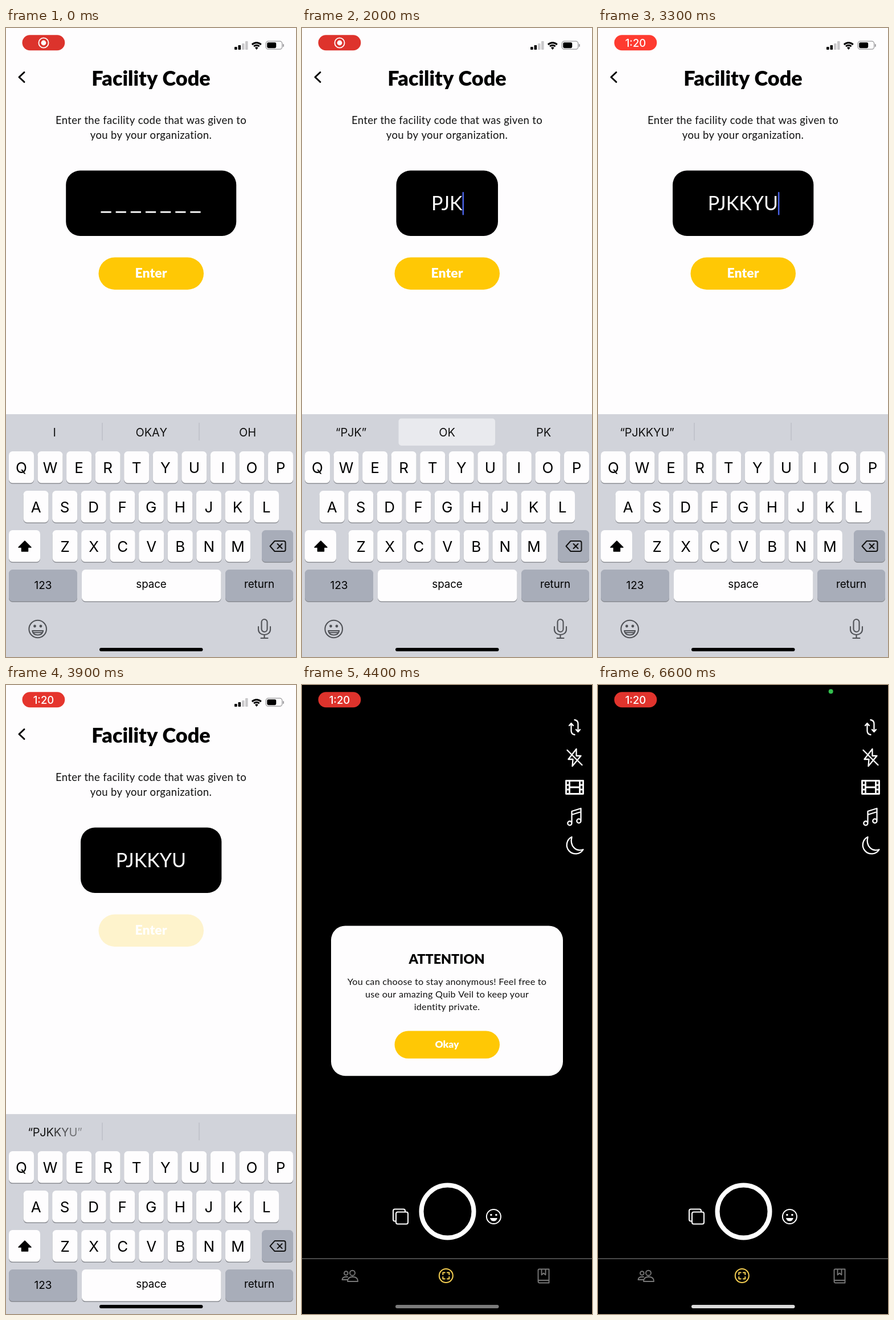
Recreate the animation shown at these times as an HTML page with a canvas. Size 509x1101 px, loop 6700 ms.

```html
<!DOCTYPE html>
<html lang="en">
<head>
<meta charset="utf-8">
<title>Facility code</title>
<style>
html, body { margin: 0; width: 100%; height: 100%; overflow: hidden; background: #fefdfe; }
canvas { display: block; }
</style>
</head>
<body>
<canvas id="stage" width="509" height="1101"></canvas>
<script>
const W = 509, H = 1101, LOOP = 6700;
const ctx = document.getElementById('stage').getContext('2d');
const YELLOW = '#ffc805', PAPER = '#fefdfe';
const BODY = 'Lato, sans-serif', UI = 'Inter, sans-serif';

const KEYBOARD_HIDE = 3859.5, PUSH = 3901, CARD_IN = 3943, CARD_OUT = 5870;
const POPUP_TIME = 130, SUGGEST_DELAY = 100, SETTLED = 0.998;
const strokes = [
  { at: 400, key: 'P', words: ['“P”', 'PLEASE', 'PM'] },
  { at: 1030, key: 'J', words: ['“PJ”', 'OH', 'PHO'] },
  { at: 1680, key: 'K', words: ['“PJK”', 'OK', 'PK'] },
  { at: 2080, key: 'K', words: ['“PJKK”', 'OKAY', 'PUKKA'] },
  { at: 2540, key: 'Y', words: ['“PJKKY”', '', ''] },
  { at: 3050, key: 'U', words: ['“PJKKYU”', '', ''] }
];

const clamp = (v, lo = 0, hi = 1) => Math.min(hi, Math.max(lo, v));
const mix = (a, b, p) => a + (b - a) * p;
// Critically damped spring, as used by system transitions.
const spring = ms => {
  const x = Math.max(0, ms) * 0.0183;
  const p = 1 - (1 + x) * Math.exp(-x);
  return p > SETTLED ? 1 : p;
};

function box(x, y, w, h, r, fill) {
  ctx.beginPath();
  ctx.roundRect(x, y, w, h, r);
  ctx.fillStyle = fill;
  ctx.fill();
}

function disc(x, y, r, fill) {
  ctx.beginPath();
  ctx.arc(x, y, r, 0, 7);
  ctx.fillStyle = fill;
  ctx.fill();
}

function text(str, x, y, size, { weight = 400, family = BODY, color = '#000', spacing = 0, align = 'center' } = {}) {
  ctx.font = `${weight} ${size}px ${family}`;
  ctx.letterSpacing = spacing + 'px';
  ctx.textAlign = align;
  ctx.fillStyle = color;
  ctx.fillText(str, x, y);
}

function outline(d, x, y, color, width, fill) {
  ctx.save();
  ctx.translate(x, y);
  ctx.lineWidth = width;
  ctx.lineCap = ctx.lineJoin = 'round';
  ctx.strokeStyle = color;
  ctx.stroke(new Path2D(d));
  if (fill) {
    ctx.fillStyle = color;
    ctx.fill(new Path2D(fill));
  }
  ctx.restore();
}

function faded(alpha, draw) {
  if (alpha <= 0) return;
  ctx.save();
  ctx.globalAlpha *= alpha;
  draw();
  ctx.restore();
}

function shifted(x, y, draw) {
  ctx.save();
  ctx.translate(x, y);
  draw();
  ctx.restore();
}

// Opacity of a button that dims on press and recovers on release.
function pressAlpha(t, down, up) {
  if (t < up) return mix(1, 0.2, clamp((t - down) / 130));
  return mix(0.2, 1, clamp((t - up) / 200));
}

// The white label lies over a white page, so only the fill needs to dim.
function button(label, y, h, size, baseline, alpha) {
  faded(alpha, () => box(162.5, y, 184.5, h, h / 2, YELLOW));
  text(label, 254.5, baseline, size, { weight: 900, color: '#fff' });
}

function statusIcons() {
  [[401, 33], [407.5, 30], [414, 27], [420, 23]].forEach(([x, y], i) =>
    box(x, y, 4.6, 38 - y, 1, i < 2 ? '#000' : '#c9c8ca'));
  ctx.strokeStyle = '#000';
  ctx.lineCap = 'butt';
  ctx.lineWidth = 3;
  for (const r of [6.7, 11.2]) {
    ctx.beginPath();
    ctx.arc(439.8, 37, r, -Math.PI * 0.75, -Math.PI * 0.25);
    ctx.stroke();
  }
  ctx.beginPath();
  ctx.moveTo(439.8, 38);
  ctx.arc(439.8, 37.4, 4, -Math.PI * 0.75, -Math.PI * 0.25);
  ctx.fillStyle = '#000';
  ctx.fill();
  ctx.beginPath();
  ctx.roundRect(456.2, 23.2, 28.5, 14, 4.2);
  ctx.lineWidth = 1.3;
  ctx.strokeStyle = '#98979a';
  ctx.stroke();
  box(458.2, 25.2, 16, 10, 2.4, '#000');
  box(486, 28, 1.8, 5, 1, '#98979a');
}

function recordingPill(t) {
  const glow = (1 - Math.cos((t - 50) / 2100 * 2 * Math.PI)) / 2;
  box(28.5, 12.3, 74.8, 27, 13.5, `rgb(${mix(220, 255, glow)},${mix(51, 59, glow)},${mix(44, 48, glow)})`);
  const clock = clamp((t - 2480) / 240);
  faded(1 - clock, () => {
    ctx.beginPath();
    ctx.arc(66, 26, 8.6, 0, 7);
    ctx.strokeStyle = '#fff';
    ctx.lineWidth = 1.8;
    ctx.stroke();
    disc(66, 26, 4.4, '#fff');
  });
  faded(clock, () => text('1:20', 66, 32.5, 18.5, { weight: 500, family: UI, color: '#fff' }));
}

function codeScreen(t, push) {
  const typed = strokes.filter(s => s.at <= t).map(s => s.key).join('');
  ctx.fillStyle = PAPER;
  ctx.fillRect(0, 0, W, H);
  statusIcons();
  faded(clamp(1 - push * 1.3), () => {
    outline('M9 -8.5L0 0L9 8.5', 23, 86, '#000', 3);
    text('Facility Code', 254.5, 101, 36, { weight: 900 });
  });
  shifted(-152 * push, 0, () => {
    const copy = { spacing: 0.33, color: '#111' };
    text('Enter the facility code that was given to', 254.5, 168, 18.5, copy);
    text('you by your organization.', 254.5, 194, 18.5, copy);

    ctx.font = `400 34px ${BODY}`;
    ctx.letterSpacing = '0px';
    const textWidth = typed ? ctx.measureText(typed).width : 175;
    const boxWidth = textWidth + 124;
    box(254.7 - boxWidth / 2, 249.5, boxWidth, 114.5, 25, '#000');
    if (typed) {
      text(typed, 254.3, 319, 34, { color: '#fff' });
      if (t < KEYBOARD_HIDE - 20) box(254.3 + textWidth / 2, 287, 2.5, 40.5, 1, '#4962e6');
    } else {
      for (let i = 0; i < 7; i++) box(166.5 + i * 26.15, 320.8, 18.2, 2.8, 0, '#fff');
    }
    button('Enter', 401.5, 56.5, 23, 437, pressAlpha(t, 3700, 3905));
  });
}

const rows = [['QWERTYUIOP', 27, 741], ['ASDFGHJKL', 52.6, 810], ['ZXCVBNM', 103.6, 879]];
const keys = rows.flatMap(([letters, x, y]) =>
  [...letters].map((letter, i) => ({ letter, x: x + i * 50.55, y })));

function keyCap(x, y, w, fill = PAPER) {
  box(x, y + 1.4, w, 55.6, 6.5, '#8b8d93');
  box(x, y, w, 55.4, 6.5, fill);
}

function keyPopup({ letter, x, y }) {
  const cx = Math.min(x, W - 38.5), top = y - 76.5;
  const l = cx - 37.5, r = cx + 37.5, kl = x - 21.8, kr = x + 21.8;
  ctx.save();
  ctx.shadowColor = 'rgba(0,0,0,.3)';
  ctx.shadowBlur = 5;
  ctx.shadowOffsetY = 1;
  ctx.beginPath();
  ctx.moveTo(l + 12, top);
  ctx.arcTo(r, top, r, top + 30, 12);
  ctx.lineTo(r, top + 48);
  ctx.bezierCurveTo(r, top + 65, kr, top + 62, kr, top + 80);
  ctx.arcTo(kr, y + 56, x, y + 56, 6.5);
  ctx.arcTo(kl, y + 56, kl, y + 30, 6.5);
  ctx.lineTo(kl, top + 80);
  ctx.bezierCurveTo(kl, top + 62, l, top + 65, l, top + 48);
  ctx.arcTo(l, top, l + 20, top, 12);
  ctx.closePath();
  ctx.fillStyle = PAPER;
  ctx.fill();
  ctx.restore();
  text(letter, cx, top + 49, 43, { weight: 300, family: UI });
}

// Draws a centred word letter by letter; look(i, n) gives [alpha, scale].
function word(str, cx, look) {
  const style = { family: UI, color: '#111', spacing: -0.2 };
  ctx.font = `400 20px ${UI}`;
  ctx.letterSpacing = '-0.2px';
  let x = cx - ctx.measureText(str).width / 2;
  [...str].forEach((ch, i) => {
    ctx.font = `400 20px ${UI}`;
    const w = ctx.measureText(ch).width;
    const [alpha, scale] = look(i, str.length);
    faded(alpha, () => text(ch, x + w / 2, 714.5, 20 * scale, style));
    x += w;
  });
}

function suggestions(t) {
  const latest = strokes.filter(s => s.at + SUGGEST_DELAY <= t).pop();
  const words = latest ? latest.words : ['I', 'OKAY', 'OH'];
  const age = latest ? t - latest.at - SUGGEST_DELAY : 1e4;
  if (latest && words[1]) {
    box(169.5, 683.5, 169.5, 47.5, 5, '#e9eaee');
  } else {
    for (const x of [168.5, 338.5]) box(x, 691, 1, 31, 0, '#b3b5bd');
  }
  word(words[0], 85, (i, n) => [clamp(1 - (t - 3850) / 80 + (n - 1 - i) * 0.15), 1]);
  word(words[1], 254.5, (i, n) => {
    const p = clamp((age - (n - 1 - i) * 40) / 60);
    return [p, mix(0.6, 1, p)];
  });
  word(words[2], 424, () => [1, 1]);
}

function keyboard(t) {
  ctx.fillStyle = '#d1d3da';
  ctx.fillRect(0, 676, W, 426);
  suggestions(t);
  for (const k of keys) {
    keyCap(k.x - 22, k.y, 44);
    text(k.letter, k.x, k.y + 37.5, 26, { family: UI });
  }
  const grey = '#a8adb9', label = { family: UI, spacing: -0.1 };
  const shift = 'M0 -9L11 2H5.5V9H-5.5V2H-11Z';
  keyCap(5, 879, 55);
  outline(shift, 33, 907, '#000', 1.5, shift);
  keyCap(449, 879, 55, grey);
  outline('M-13 0L-5 -9H11Q14 -9 14 -6V6Q14 9 11 9H-5ZM0 -4L8 4M8 -4L0 4', 476.5, 907, '#111', 2);
  keyCap(5, 948, 120, grey);
  text('123', 65, 981.5, 19, label);
  keyCap(133, 948, 244.5);
  text('space', 255, 980, 18.8, label);
  keyCap(385, 948, 119, grey);
  text('return', 444.5, 980, 18.8, label);

  const ink = '#505257';
  outline('M-15.3 0a15.3 15.3 0 1 0 30.6 0a15.3 15.3 0 1 0 -30.6 0M-9.5 3H9.5Q8 10.5 0 10.5T-9.5 3ZM-8 6.2H8',
    55.7, 1052, ink, 2.1);
  disc(50.5, 1047, 2.4, ink);
  disc(61, 1047, 2.4, ink);
  outline('M-5 -11a5 5 0 0 1 10 0V1a5 5 0 0 1 -10 0ZM-10.5 -3V2C-10.5 14 10.5 14 10.5 2V-3M0 11V17M-6 17H6',
    453.5, 1051, ink, 2.1);

  const active = strokes.find(s => t >= s.at && t < s.at + POPUP_TIME);
  if (active) keyPopup(keys.find(k => k.letter === active.key));
}

function smiley(x, y) {
  outline('M-12.5 0a12.5 12.5 0 1 0 25 0a12.5 12.5 0 1 0 -25 0', x, y, '#fff', 2, 'M-6.5 2.5H6.5Q5 8 0 8T-6.5 2.5Z');
  disc(x - 4.5, y - 3, 1.8, '#fff');
  disc(x + 4.5, y - 3, 1.8, '#fff');
}

function cameraScreen() {
  ctx.fillStyle = '#000';
  ctx.fillRect(0, 0, W, H);
  const icon = (d, y, width = 2.3) => outline(d, 478.5, y, '#fff', width);
  icon('M-6 -6V6Q-6 12 0 13M-9.5 -3L-6 -7L-2.5 -3M0 -13Q6 -12 6 -6V7M2.5 4L6 8L9.5 4', 74);
  icon('M3 -15L-11 3H-3L-4 15L11 -3H3ZM-13 -13L13 13', 127);
  icon('M-15 -11.5H15V11.5H-15ZM-9 -11V11M9 -11V11M-9 0H9M-14 -4H-10M-14 4H-10M10 -4H14M10 4H14', 179, 2.8);
  icon('M-5 10V-10L11 -15V6M-5 -4L11 -9M-5 11a3.6 3.6 0 1 1 -7.2 0a3.6 3.6 0 1 1 7.2 0M11 7a3.6 3.6 0 1 1 -7.2 0a3.6 3.6 0 1 1 7.2 0', 231);
  icon('M-5 -15C-9 2 3 11 15 7A15.5 15.5 0 1 1 -5 -15Z', 281);

  ctx.beginPath();
  ctx.arc(255.5, 921.5, 46, 0, 7);
  ctx.strokeStyle = '#fff';
  ctx.lineWidth = 8;
  ctx.stroke();
  outline('M-8 8H-10Q-13 8 -13 5V-10Q-13 -13 -10 -13H5Q8 -13 8 -10V-8M-5 -8H10Q13 -8 13 -5V10Q13 13 10 13H-5Q-8 13 -8 10V-5Q-8 -8 -5 -8Z',
    173, 930.5, '#fff', 2);
  smiley(336.4, 930.5);
}

function tabBar() {
  ctx.fillStyle = '#000';
  ctx.fillRect(0, 1003.5, W, 98);
  box(0, 1003.5, W, 1.2, 0, '#747474');
  const grey = '#777';
  outline('M-10 -4.5a3.3 3.3 0 1 0 6.6 0a3.3 3.3 0 1 0 -6.6 0M0 -4.8a4.5 4.5 0 1 0 9 0a4.5 4.5 0 1 0 -9 0M-4 10H14Q14 2 5 2T-4 10ZM-5 7H-13.5Q-13 2 -6.5 2H-4',
    84, 1034, grey, 1.9);
  outline('M-12 0a12 12 0 1 0 24 0a12 12 0 1 0 -24 0M-5.5 -2V-5.5H-2M2 -5.5H5.5V-2M5.5 2V5.5H2M-2 5.5H-5.5V2',
    252.8, 1034, '#f5cf52', 2);
  outline('M-9.5 9V-10Q-9.5 -12 -7.5 -12H9.5V12H-7Q-9.5 12 -9.5 9.5Q-9.5 7.5 -7 7.5H9.5M-3.5 -12V-2L0 -5L3.5 -2V-12',
    424, 1034.5, grey, 1.9);
}

function card(t) {
  const offset = 681 * (1 - spring(t - CARD_IN)) + 700 * spring(t - CARD_OUT);
  if (offset > 681) return;
  shifted(0, 420 + offset, () => {
    ctx.save();
    ctx.shadowColor = 'rgba(0,0,0,.3)';
    ctx.shadowBlur = 6;
    ctx.shadowOffsetY = 2;
    box(51, 0, 407, 262.8, 25, PAPER);
    ctx.restore();
    text('ATTENTION', 254, 66.5, 23.3, { weight: 900 });
    const copy = { spacing: 0.25, color: '#111' };
    text('You can choose to stay anonymous! Feel free to', 254.5, 103.5, 16.2, copy);
    text('use our amazing Quib Veil to keep your', 254.5, 125.7, 16.2, copy);
    text('identity private.', 254.5, 147.9, 16.2, copy);
    button('Okay', 184, 48.3, 17.5, 213.7, pressAlpha(t, 5700, CARD_OUT));
  });
}

function draw(t) {
  const push = spring(t - PUSH);
  if (push < 1) codeScreen(t, push);
  if (t > PUSH) {
    shifted(W * (1 - push), 0, cameraScreen);
    tabBar();
    card(t);
  }
  const hide = spring(t - KEYBOARD_HIDE);
  if (hide < 1) shifted(0, 425 * hide, () => keyboard(t));
  recordingPill(t);
  if (t >= 5100) disc(408.7, 11.3, 4, '#34c04f');
  const shade = 218 * clamp((t - 4200) / 360);
  box(164, 1085, 181.5, 6, 3, `rgb(${shade},${shade},${shade})`);
}

function frame(now) {
  draw(now % LOOP);
  requestAnimationFrame(frame);
}
requestAnimationFrame(frame);
</script>
</body>
</html>
```
